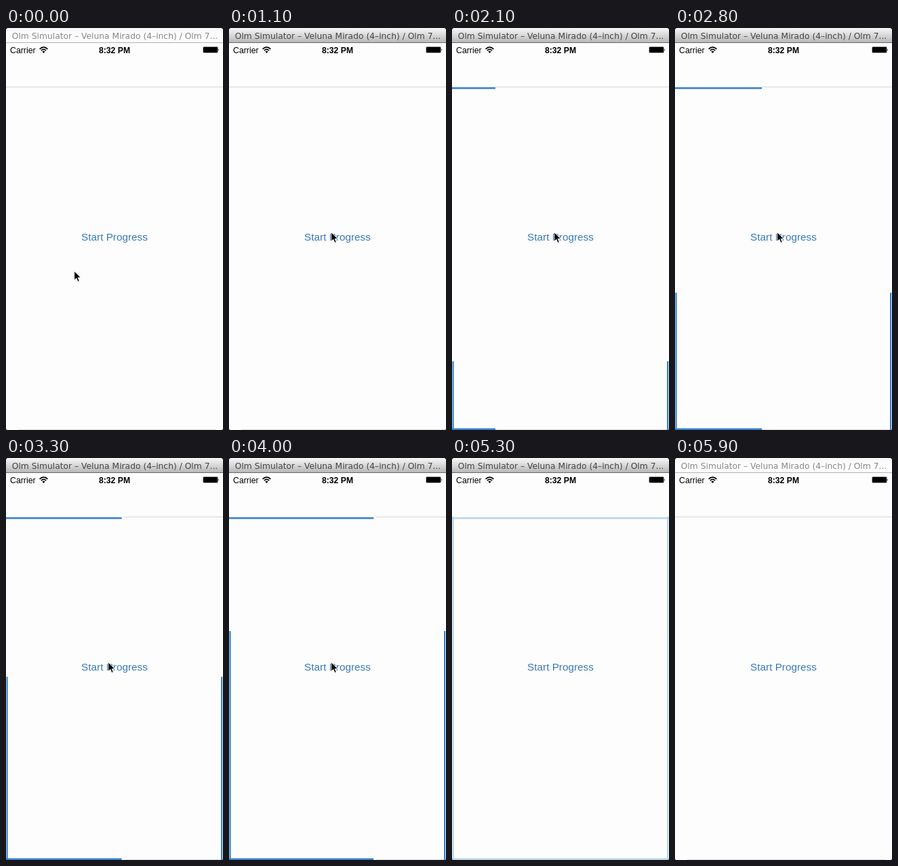
Recreate the animation shown at these times as an HTML page. Size 320 by 590 pixels, loop 6000 ms.

```html
<!DOCTYPE html>
<html lang="en">
<head>
<meta charset="utf-8">
<title>Progress border</title>
<style>
  html, body { margin: 0; width: 100%; height: 100%; overflow: hidden; background: #000; }
  svg { display: block; width: 100vw; height: 100vh; }
  text { font-family: "Liberation Sans", Arial, sans-serif; }
  .title { font: 12.3px "DejaVu Sans", sans-serif; text-anchor: middle; }
  .bar { fill: #347fcd; }
  .hair { fill: #d6d6d6; }
</style>
</head>
<body>
<svg viewBox="0 0 320 590">
  <defs>
    <linearGradient id="idle" x2="0" y2="1">
      <stop offset="0" stop-color="#f6f6f6"/>
      <stop offset=".4" stop-color="#fdfdfd"/>
    </linearGradient>
    <linearGradient id="metal" x2="0" y2="1">
      <stop offset="0" stop-color="#f6f6f6"/>
      <stop offset=".35" stop-color="#e2e2e2"/>
      <stop offset="1" stop-color="#b8b8b8"/>
    </linearGradient>
    <clipPath id="win">
      <path d="M0 4Q0 0 4 0H316Q320 0 320 4V588Q320 590 318 590H2Q0 590 0 588Z"/>
    </clipPath>
  </defs>
  <g clip-path="url(#win)">
    <rect width="320" height="590" fill="#fdfdfd"/>
    <rect id="head" width="320" height="21"/>
    <rect id="edge" y="21" width="320" height="1"/>
    <text id="title" class="title" x="160.5" y="16">Olm Simulator – Veluna Mirado (4–inch) / Olm 7...</text>

    <text x="6" y="36.6" font-size="12.3">Carrier</text>
    <g fill="none" stroke="#000" stroke-width="1.7">
      <path d="M49.6 30.9Q55.5 25.3 61.4 30.9M51.8 33.2Q55.5 29.7 59.2 33.2"/>
    </g>
    <path d="M53.3 34.6Q55.5 32.9 57.7 34.6L55.5 37Z"/>
    <text x="160" y="36.6" font-size="12.2" font-weight="bold" text-anchor="middle">8:32 PM</text>
    <rect x="290.5" y="27.5" width="22" height="9" rx="1.5" fill="none" stroke="#aaa"/>
    <rect x="291" y="28" width="21" height="8" rx="1"/>
    <path d="M313.3 30.2Q315 32 313.3 34Z"/>

    <rect id="lineA" class="hair" y="86" height="1"/>
    <rect id="lineB" class="hair" y="589" height="1"/>
    <text x="160" y="311.5" font-size="15.3" fill="#3a78b8" text-anchor="middle">Start Progress</text>

    <g id="bars">
      <rect id="top" class="bar" y="87" height="2.5"/>
      <rect id="bottom" class="bar" y="587.5" height="2.5"/>
      <rect id="left" class="bar" x=".5" width="2.2"/>
      <rect id="right" class="bar" x="317" width="2.2"/>
    </g>
  </g>
  <g id="cursor">
    <path transform="translate(.7 .7) scale(.92)" d="M0 0V14.6L3.4 11.5L5.8 17L8.3 15.9L5.9 10.6H10.4Z" stroke="#fff" stroke-width="1"/>
  </g>
</svg>
<script>
const LOOP = 6000, TICK = 100, W = 320, TOP = 86, END = 590;
const STEP_AT = [1400, 2200, 3100, 3900, 4700], STEP_MS = 300;
const FADE = [[5200, 1], [5350, 0]];
// time, x, y of the pointer tip
const PATH = [
  [0, 100, 356], [100, 103, 352], [300, 127, 326], [500, 147, 303], [600, 150, 299],
  [4700, 150, 299], [4800, 150, 303], [4900, 160, 360], [5000, 180, 470], [5100, 200, 600]
];

const el = id => document.getElementById(id);
const set = (id, attrs) => {
  for (const k in attrs) el(id).setAttribute(k, attrs[k]);
};
const clamp = v => Math.min(1, Math.max(0, v));

function at(keys, t) {
  let i = 0;
  while (i < keys.length - 2 && t >= keys[i + 1][0]) i++;
  const [a, b] = [keys[i], keys[i + 1]];
  const u = clamp((t - a[0]) / (b[0] - a[0]));
  return a.slice(1).map((v, k) => v + (b[k + 1] - v) * u);
}

function draw(t) {
  const active = t >= 1100 && t < 5800;
  set("head", { fill: active ? "url(#metal)" : "url(#idle)" });
  set("edge", { fill: active ? "#686868" : "#b4b4b4" });
  set("title", { fill: active ? "#454545" : "#888" });

  const parts = STEP_AT.map(s => clamp((t - s) / STEP_MS));
  const p = parts.reduce((a, b) => a + b, 0) / STEP_AT.length;
  const moving = parts.some(v => v > 0 && v < 1);
  const alpha = at(FADE, t)[0];
  const w = W * p, h = (END - TOP) * p;

  set("bars", { opacity: alpha });
  set("top", { width: w });
  set("bottom", { width: w });
  set("left", { y: END - h, height: h });
  set("right", { y: END - h, height: h });

  // hairlines fill what the bars leave free
  const from = alpha > 0 ? Math.min(W, w + (moving ? 3 : 0)) : 0;
  const start = Math.max(18, from), end = active ? W : 310;
  set("lineA", { x: from, width: W - from });
  set("lineB", { x: start, width: Math.max(0, end - start) });

  const [x, y] = at(PATH, t);
  set("cursor", { transform: `translate(${x} ${y})` });
}

function frame() {
  draw(Math.floor(performance.now() % LOOP / TICK) * TICK);
  requestAnimationFrame(frame);
}
frame();
</script>
</body>
</html>
```
